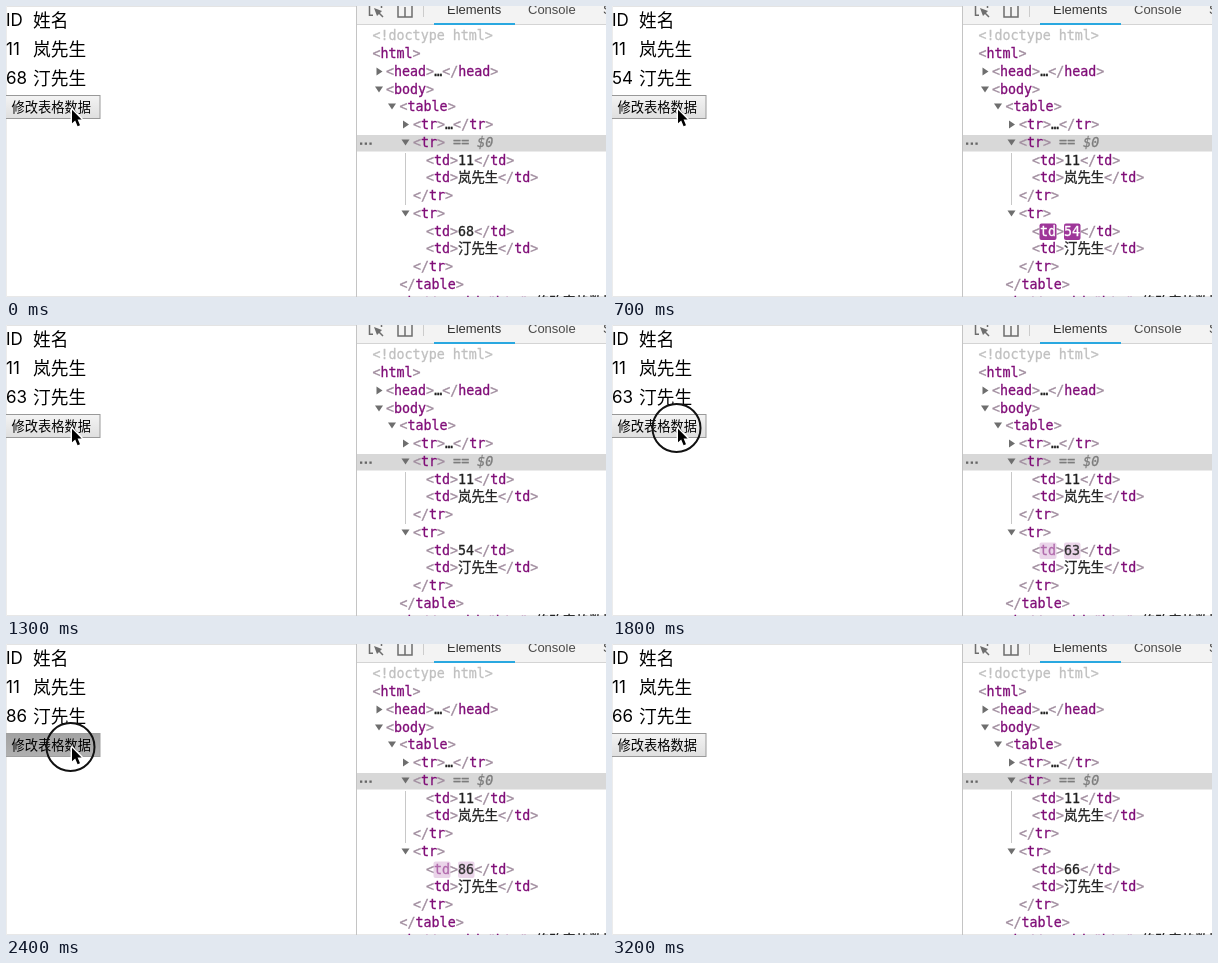
An HTML page with a canvas that plays this animation: 600x291 px, repeating every 3300 ms.

```html
<!DOCTYPE html>
<html lang="zh">
<head>
<meta charset="utf-8">
<title>修改表格数据</title>
<style>
html, body { margin: 0; width: 100%; height: 100%; overflow: hidden; background: #fff; }
canvas { display: block; width: 600px; height: 291px; }
</style>
</head>
<body>
<canvas id="stage"></canvas>
<script>
const canvas = document.getElementById('stage');
const ctx = canvas.getContext('2d');
const scale = window.devicePixelRatio || 1;
canvas.width = 600 * scale;
canvas.height = 291 * scale;

const LOOP = 3300, STEP = 100, FADE = 600;
const CJK = '"Noto Sans CJK SC", "Noto Sans CJK", sans-serif';
const TAB = '13px "Liberation Sans", sans-serif';
const PAGE = '17px Inter, sans-serif';
const MONO = '13.33px "DejaVu Sans Mono", "Noto Sans CJK SC", monospace';
const TAG = [128, 14, 120], INK = [34, 34, 34], WHITE = [255, 255, 255];
const BRACKET = '#a08c9e', GREY = '#6e6e6e';
const NAMES = ['岚先生', '汀先生'];

// Each click: ring appears, button goes down, page updates, inspector updates.
const clicks = [
  { ring: 400, down: 500, page: 600, tree: 700, value: '54' },
  { ring: 1100, down: 1200, page: 1300, tree: 1400, value: '63' },
  { ring: 1800, down: 1900, page: 2000, tree: 2000, value: '86' },
  { ring: 2300, down: 2400, page: 2500, tree: 2500, value: '66' }
];

const rgb = c => `rgb(${c})`;
const mix = (a, b, k) => rgb(a.map((v, i) => Math.round(v + (b[i] - v) * k)));

function rect(x, y, w, h, color) {
  ctx.fillStyle = color;
  ctx.fillRect(x, y, w, h);
}

function text(str, x, y, font, color) {
  ctx.font = font;
  ctx.fillStyle = color;
  ctx.fillText(str, x, y);
  return x + ctx.measureText(str).width;
}

const rowY = n => Math.round(34.3 + n * 17.75);

// Inspector text, slightly thickened by a hairline outline.
function code(str, x, row, color, style = '') {
  const end = text(str, x, rowY(row), style + MONO, color);
  ctx.strokeStyle = color;
  ctx.lineWidth = 0.3;
  ctx.strokeText(str, x, rowY(row));
  return end;
}

function path(points, fill, stroke, width = 1) {
  ctx.beginPath();
  points.forEach(([x, y]) => ctx.lineTo(x, y));
  ctx.closePath();
  if (stroke) {
    ctx.strokeStyle = stroke;
    ctx.lineWidth = width;
    ctx.stroke();
  }
  ctx.fillStyle = fill;
  ctx.fill();
}

function box(x, y, w, h, color) {
  ctx.fillStyle = color;
  ctx.beginPath();
  ctx.roundRect(x, y, w, h, 2);
  ctx.fill();
}

// Writes markup with coloured brackets and tag names; returns the end x.
function markup(str, x, row) {
  let inTag = false;
  for (const part of str.match(/<\/?|>|[^<>]+/g)) {
    const edge = /[<>]/.test(part);
    x = code(part, x, row, edge ? BRACKET : rgb(inTag ? TAG : INK));
    if (edge) inTag = part !== '>';
  }
  return x;
}

function arrow(x, row, open) {
  const y = rowY(row) - 4.5;
  path(open ? [[x - 4, y - 3], [x + 4, y - 3], [x, y + 3]]
            : [[x - 2.5, y - 4], [x + 3.5, y], [x - 2.5, y + 4]], GREY);
}

function drawPage(value, pressed) {
  const rows = [['ID', '姓名'], ['11', NAMES[0]], [value, NAMES[1]]];
  rows.forEach(([id, name], i) => {
    text(id, 0, 20 + 29 * i, PAGE, '#000');
    text(name, 27, 21 + 29 * i, '17.7px ' + CJK, '#000');
  });
  const face = ctx.createLinearGradient(0, 89, 0, 113);
  face.addColorStop(0, pressed ? '#a2a2a2' : '#f4f4f4');
  face.addColorStop(1, pressed ? '#b0b0b0' : '#dedede');
  rect(0, 89, 94.5, 24, pressed ? '#a0a0a0' : '#999');
  rect(0, 90, 93.5, 22, face);
  text('修改表格数据', 5.5, 106, '13.25px ' + CJK, '#000');
}

function drawToolbar() {
  rect(351, 0, 249, 18, '#f3f3f3');
  rect(351, 18, 249, 1, '#d4d4d4');
  rect(428, 17, 81, 2, '#2aa8e0');
  rect(417, 0, 1, 11, '#ccc');
  text('Elements', 441, 8, TAB, '#333');
  text('Console', 522, 8, TAB, '#4a4a4a');
  text('Sources', 597, 8, TAB, '#4a4a4a');
  ctx.strokeStyle = GREY;
  ctx.lineWidth = 1.5;
  ctx.beginPath();
  ctx.moveTo(367, 9.3);
  ctx.lineTo(363.5, 9.3);
  ctx.lineTo(363.5, -2);
  ctx.moveTo(375.5, -2);
  ctx.lineTo(375.5, 2);
  ctx.moveTo(371, 5);
  ctx.lineTo(377, 11);
  ctx.rect(392, -6, 14, 17);
  ctx.moveTo(399, 1);
  ctx.lineTo(399, 11);
  ctx.stroke();
  path([[368, 2], [376, 5], [371, 10]], GREY);
}

function drawTree(value, glow) {
  rect(351, 129, 249, 16.5, '#d8d8d8');
  rect(399, 147, 1, 52, '#c8c8c8');
  [355, 359.7, 364.4].forEach(x => rect(x - 1, 136.5, 2.3, 2.3, '#666'));

  code('<!doctype html>', 366.5, 0, '#c0c0c0');
  markup('<html>', 366.5, 1);
  markup('<head>…</head>', 380, 2);
  markup('<body>', 380, 3);
  markup('<table>', 393.5, 4);
  markup('<tr>…</tr>', 407, 5);
  const end = markup('<tr>', 407, 6);
  code(' == $0', end, 6, '#7d7d7d', 'italic ');
  markup('<td>11</td>', 420, 7);
  markup(`<td>${NAMES[0]}</td>`, 420, 8);
  markup('</tr>', 407, 9);
  markup('<tr>', 407, 10);
  markup(`<td>${NAMES[1]}</td>`, 420, 12);
  markup('</tr>', 407, 13);
  markup('</table>', 393.5, 14);
  markup('<button id="btn">修改表格数据', 393.5, 15);
  [[373, 2, 0], [373, 3, 1], [386, 4, 1], [399.5, 5, 0], [399.5, 6, 1], [399.5, 10, 1]]
    .forEach(a => arrow(...a));

  if (glow > 0) {
    const color = `rgba(158,54,153,${glow})`;
    box(427.5, 217.5, 17, 16.5, color);
    box(452, 217.5, 16.5, 16.5, color);
  }
  let x = code('<', 420, 11, BRACKET);
  x = code('td', x, 11, mix(TAG, WHITE, Math.min(1, glow * 1.8)));
  x = code('>', x, 11, BRACKET);
  x = code(value, x, 11, mix(INK, WHITE, glow > 0.5 ? glow : glow * 0.4));
  markup('</td>', x, 11);
}

function drawCursor(t, ring) {
  const u = Math.pow(Math.max(0, t - 2500) / 300, 1.4);
  const x = 65 + 272 * u, y = 103 + 135 * u;
  if (ring) {
    ctx.strokeStyle = '#111';
    ctx.lineWidth = 2;
    ctx.beginPath();
    ctx.arc(64.5, 103, 24, 0, 7);
    ctx.stroke();
  }
  const shape = [[0, 0], [0, 13.5], [3.2, 10.6], [5.6, 16.4], [8, 15.4], [5.6, 9.8], [9.6, 9.8]];
  ctx.lineJoin = 'round';
  path(shape.map(([a, b]) => [x + a + 1, y + b + 0.8]), '#000', '#fff', 2.8);
  ctx.lineJoin = 'miter';
}

function draw(now) {
  const t = Math.floor((now % LOOP) / STEP) * STEP;
  const lastBy = key => clicks.filter(c => c[key] <= t).pop();
  const during = key => clicks.some(c => t >= c[key] && t < c.page);
  const page = lastBy('page'), tree = lastBy('tree');
  const glow = tree ? Math.pow(Math.max(0, 1 - (t - tree.tree) / FADE), 1.4) : 0;

  ctx.setTransform(scale, 0, 0, scale, 0, 0);
  rect(0, 0, 600, 291, '#fff');
  rect(0, 0, 350, 1, '#e4e4e4');
  rect(0, 290, 600, 1, '#e8e8e8');
  rect(0, 0, 1, 291, '#ececec');
  drawPage(page ? page.value : '68', during('down'));
  rect(350, 0, 1, 291, '#c4c4c4');
  drawToolbar();
  drawTree(tree ? tree.value : '68', glow);
  drawCursor(t, during('ring'));
  requestAnimationFrame(draw);
}
requestAnimationFrame(draw);
</script>
</body>
</html>
```
